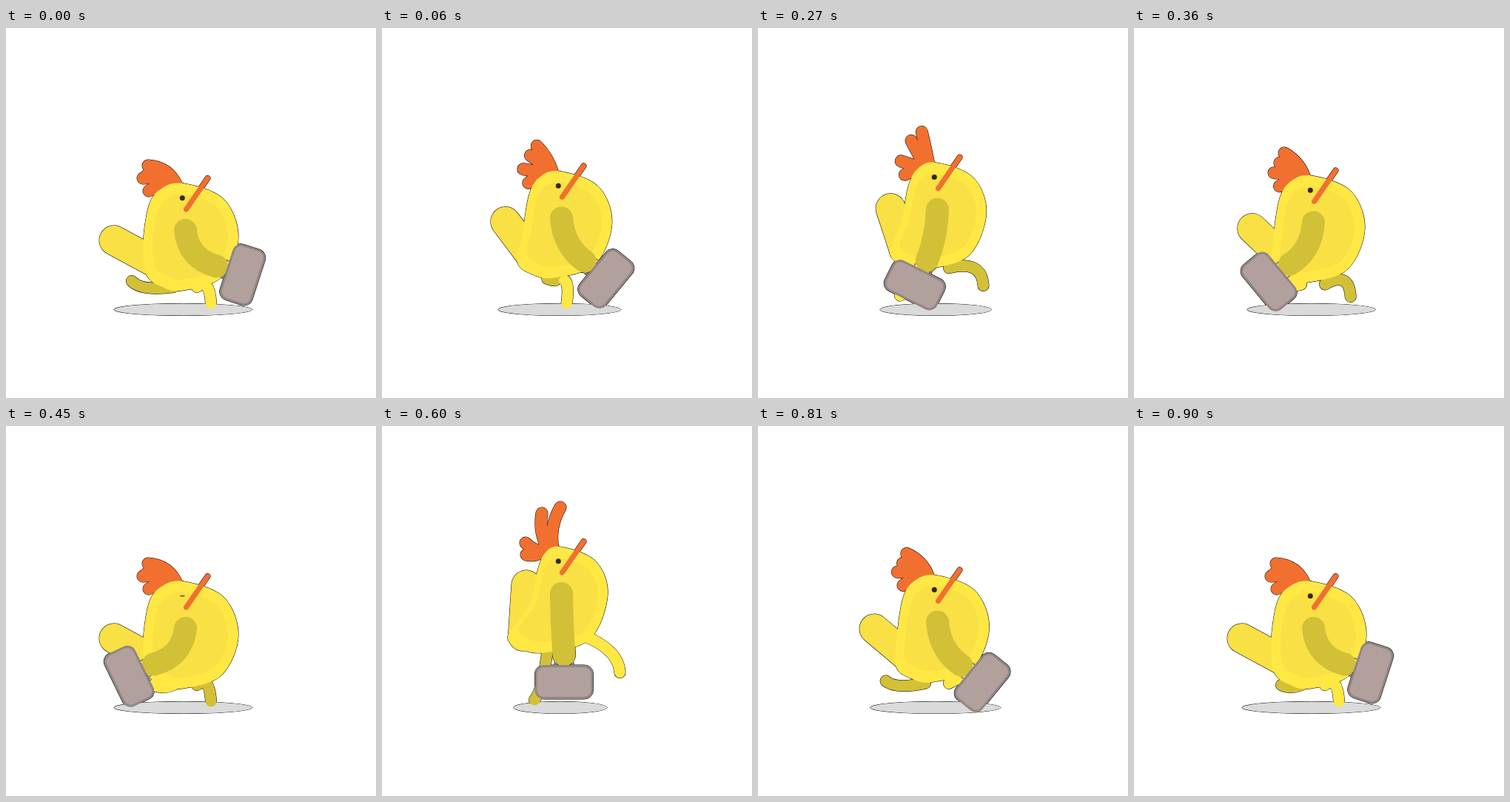
These frames come from a looping animation (500 by 500 pixels, 0.93 s). An HTML page with a canvas:

```html
<!DOCTYPE html>
<html lang="en">
<head>
<meta charset="utf-8">
<title>Walking chicken</title>
<style>
html, body { margin: 0; width: 100%; height: 100%; overflow: hidden; background: #fff; }
canvas { display: block; }
</style>
</head>
<body>
<canvas id="stage" width="500" height="500"></canvas>
<script>
const ctx = document.getElementById('stage').getContext('2d');
const LOOP = 930, STEP = 30, CYCLE = 900;
const YELLOW = '#ffe744', SOFT = '#f8e045', DARK = '#d2c037', ORANGE = '#f1702f';
const CASE = '#b1a09b', RIM = '#918685';

// Key poses: [time, hop height 0..1, arm swing -1..1]
const gait = [[0, 0, 1], [150, 1, 0], [270, 0.6, -0.4], [450, 0, -1],
  [600, 1, 0], [720, 0.51, 0.3], [900, 0, 1]];

// One stride of a foot: [time, x, y]
const stride = [[0, 199, 350], [150, 321.5, 333], [270, 304.5, 348], [450, 277, 372],
  [600, 206, 370], [720, 192, 361.5], [840, 170, 342], [900, 199, 350]];
// The far foot opens the loop stretched back.
const farStride = [[0, 170, 342], ...stride.slice(1)];

// Points around the body and feather tips: [x, y] crouched, then [x, y] at the top of the hop
const bodyPoints = [[240, 210, 240, 163], [294, 231, 288, 182], [314, 283, 305, 228],
  [291, 337, 281, 288], [237, 355, 222, 306], [209, 349, 189, 302], [190, 334, 170, 284],
  [185, 296, 199, 242], [193, 240, 210, 196], [210, 217, 220, 172]];
const featherTips = [[192, 186, 241, 157], [190, 199, 216, 165],
  [185, 203, 194, 205], [193, 220, 195, 221]];

const mix = (a, b, k) => a + (b - a) * k;
const clamp = (v, lo = 0, hi = 1) => Math.min(hi, Math.max(lo, v));
const morph = ([x0, y0, x1, y1], k) => [mix(x0, x1, k), mix(y0, y1, k)];

// Smooth interpolation that comes to rest at every turning point.
function sample(track, t) {
  let i = 0;
  while (i < track.length - 2 && t > track[i + 1][0]) i++;
  const a = track[i], b = track[i + 1], span = b[0] - a[0];
  const u = (t - a[0]) / span, v = 1 - u;
  const slope = (j, n) => {
    const p = track[j - 1], q = track[j], r = track[j + 1];
    if (!p || !r) return 0;
    const s1 = (q[n] - p[n]) / (q[0] - p[0]), s2 = (r[n] - q[n]) / (r[0] - q[0]);
    return s1 * s2 > 0 ? 2 * s1 * s2 / (s1 + s2) : 0;
  };
  return a.map((from, n) => from * v * v * (1 + 2 * u) + b[n] * u * u * (3 - 2 * u)
    + span * u * v * (slope(i, n) * v - slope(i + 1, n) * u)).slice(1);
}

let outline = false;

function stroke(path, color, width) {
  ctx.strokeStyle = outline ? '#000' : color;
  ctx.lineWidth = width + (outline ? 1 : 0);
  ctx.stroke(path);
}

function fill(path, color) {
  ctx.fillStyle = outline ? '#000' : color;
  ctx.fill(path);
  if (outline) stroke(path, color, 0);
}

function bend(x1, y1, cx, cy, x2, y2) {
  const path = new Path2D();
  path.moveTo(x1, y1);
  path.quadraticCurveTo(cx, cy, x2, y2);
  return path;
}

const line = (x1, y1, x2, y2) => bend(x1, y1, x1, y1, x2, y2);

function oval(x, y, rx, ry) {
  const path = new Path2D();
  path.ellipse(x, y, rx, ry, 0, 0, Math.PI * 2);
  return path;
}

function box(y, w, h, r) {
  const path = new Path2D();
  path.roundRect(-w / 2, y - h / 2, w, h, r);
  return path;
}

// Closed Catmull-Rom curve.
function blob(points) {
  const path = new Path2D(), n = points.length, at = i => points[(i + n) % n];
  path.moveTo(...points[0]);
  points.forEach(([x, y], i) => {
    const [px, py] = at(i - 1), [nx, ny] = at(i + 1), [fx, fy] = at(i + 2);
    path.bezierCurveTo(x + (nx - px) / 6, y + (ny - py) / 6,
      nx - (fx - x) / 6, ny - (fy - y) / 6, nx, ny);
  });
  path.closePath();
  return path;
}

function drawLeg([x, y], hop, color) {
  const front = clamp((x - 205) / 70);
  const kneeX = x + mix(13, -2, front), kneeY = mix(356, y - 35, front);
  stroke(bend(x, y, kneeX, kneeY, mix(226, 258, front), 350 - 72 * hop * hop), color, 15);
}

function drawComb(hop, sway) {
  const bulge = mix(0.3, -0.18, hop);
  featherTips.forEach((tip, i) => {
    let [x, y] = morph(tip, hop);
    x += 1.5 * i * sway;
    y += 2 * i * sway;
    const rootX = 231 - 6 * i, rootY = 213 + 2 * i, dx = rootX - x, dy = rootY - y;
    stroke(bend(x, y, x + dx / 2 + dy * bulge, y + dy / 2 - dx * bulge, rootX, rootY), ORANGE, 16);
  });
}

function drawBody(hop, sway) {
  const [tipX, tipY] = morph([146, 287, 195, 215], hop);
  stroke(line(tipX + 4 * sway, tipY, ...morph([207, 320, 190.5, 284], hop)), SOFT, 40);

  const shape = blob(bodyPoints.map(p => morph(p, hop)));
  const [cx, cy] = morph([247, 282, 242, 236], hop);
  fill(shape, YELLOW);
  ctx.save();
  ctx.translate(cx, cy);
  ctx.scale(0.79, 0.79);
  ctx.translate(-cx, -cy);
  fill(shape, SOFT);
  ctx.restore();
}

function drawArm(swing, dy) {
  const x = 246 + 42.5 * swing - 4 * swing * swing;
  const y = 356 - 34 * Math.abs(swing) + dy;
  const atHand = draw => {
    ctx.save();
    ctx.translate(x, y);
    ctx.rotate((-68 * swing - 4 * swing * swing) * Math.PI / 180);
    draw();
    ctx.restore();
  };
  atHand(() => stroke(box(14, 24, 12, 3), RIM, 2));
  stroke(bend(242.5, 273.5 + dy, mix(242.5, x, 0.1), 312 + dy, x, y), DARK, 31);
  atHand(() => {
    fill(box(37, 79, 46, 12), RIM);
    fill(box(37, 73, 40, 9), CASE);
  });
}

function drawScene(t) {
  const [hop, swing] = sample(gait, t), sway = 4 * hop * (1 - hop), dy = -47 * hop;

  fill(oval(239.5 + 1.5 * hop, 380.5, 93.5 - 30 * hop, 8), '#dadada');
  drawLeg(sample(farStride, t), hop, DARK);
  drawLeg(sample(stride, (t + CYCLE / 2) % CYCLE), hop, YELLOW);

  ctx.save();
  ctx.translate(0, dy);
  drawComb(hop, sway);
  ctx.restore();
  drawBody(hop, sway);

  const openness = clamp(Math.abs(t - CYCLE / 2) / 75, 0.17);
  fill(oval(238.3, 229.7 + dy, 3.5, 3.5 * openness), '#33291c');
  stroke(line(272.5, 203 + dy, 243.5, 245 + dy), ORANGE, 7);
  drawArm(swing, dy);
}

function frame(now) {
  const t = Math.floor((now % LOOP) / STEP) * STEP;
  ctx.clearRect(0, 0, 500, 500);
  ctx.lineCap = ctx.lineJoin = 'round';
  // A black, slightly larger silhouette leaves a thin contour.
  for (outline of [true, false]) drawScene(t);
  requestAnimationFrame(frame);
}
requestAnimationFrame(frame);
</script>
</body>
</html>
```
